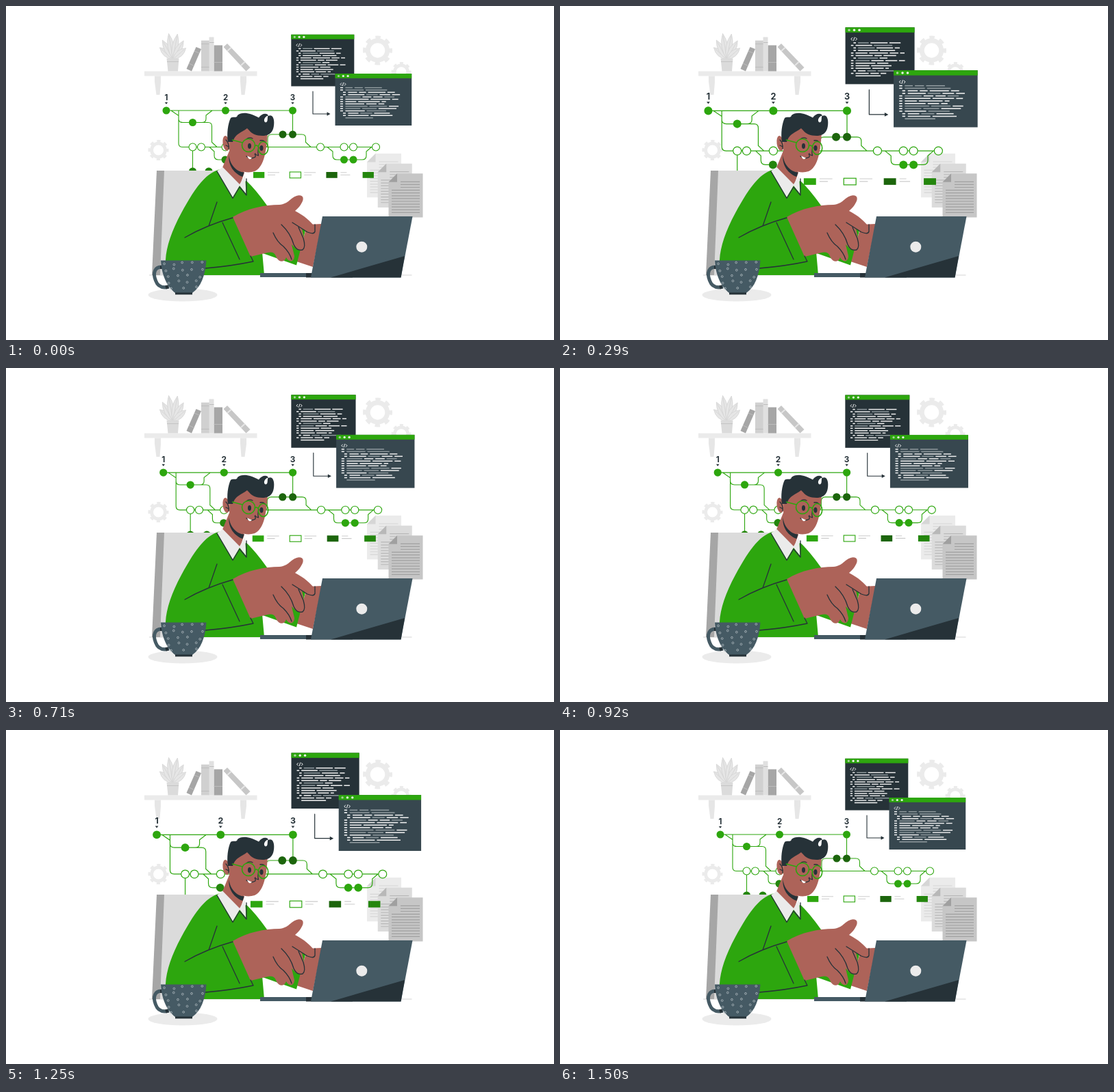
An HTML page that plays this animation: 800 by 489 pixels, repeating every 1.54 s.

```html
<!DOCTYPE html>
<html lang="en">
<head>
<meta charset="utf-8">
<title>Developer at work</title>
<style>
html, body { margin: 0; height: 100%; overflow: hidden; background: #fff; }
svg { display: block; width: 100%; height: 100%; }
.green { fill: #2da60e; }
.dark { fill: #263238; }
.deep { fill: #1c650c; }
.mid { fill: #24860d; }
.skin { fill: #ad6359; }
.slate { fill: #455a64; }
.pale { fill: #ebebeb; }
.wire { fill: none; stroke: #2da60e; stroke-width: 1.1; }
.frame { fill: none; stroke: #2da60e; stroke-width: 1.6; }
.open { fill: #fff; stroke: #2da60e; stroke-width: 1.1; }
.ink { fill: none; stroke: #263238; stroke-width: 1.3; stroke-linecap: round; stroke-linejoin: round; }
.label { font: 700 11.5px Inter, sans-serif; text-anchor: middle; fill: #263238; }
</style>
</head>
<body>
<svg viewBox="0 0 800 489">
  <g id="gears" fill="none" stroke="#ebebeb"></g>

  <g id="shelf">
    <path class="pale" d="M202 95.5H366.500V102.500H202Z"/>
    <path fill="#e6e6e6" d="M217 102.500h9v9l-1.500 18.500h-5L217 111ZM342 102.500h9v9L348.500 130h-5L342 111Z"/>
    <path fill="#a6a6a6" d="M277.500 60l7.500 3-14 32.500-7.500-3.500ZM303.500 57.500H316v38h-12.500Z"/>
    <path fill="#d0d0d0" d="M285 50.500h12v45h-12Z"/>
    <path fill="#e0e0e0" d="M296.500 45.500h7v50h-7Z"/>
    <path fill="#c7c7c7" d="M317.500 60l5.500-5 33.500 35-6 5.500Z"/>
    <path fill="none" stroke="#bdbdbd" d="M285 55.500h11.500M285 89.500h11.500M297 53.500h6.500M303.500 82.500H316M275 66l7 3M267 84l7.500 3.500"/>
    <path fill="none" stroke="#e6e6e6" stroke-width="2" d="M323 66l6-5.500M343 87l6-5.500"/>
    <g id="leaves" fill="#e6e6e6" stroke="#d2d2d2" stroke-width=".7"></g>
    <path fill="#dbdbdb" d="M234.500 76.500h18l-1.500 19h-14.500Z"/>
    <path fill="none" stroke="#c4c4c4" d="M235 81.500h17"/>
  </g>

  <g id="papers"></g>

  <g id="board">
    <path class="wire" d="M234 153H418.500V188M252 153V201Q252 206.500 257.500 206.500H540
      M241 153L252 160.500V165Q252 170.500 258 170.500H286Q292 170.500 292 165V160L301 153
      M272 170.500H295Q300.500 170.500 300.500 176V199.500L308 206.500M272.500 206.500V242
      M297 206.500L304 213V219Q304 225 310 225H320
      M380 206.500L382 204V194Q382 188 388 188H432Q437.500 188 437.500 193.500V199.500L445 206.500
      M469 206.500L477 213V219Q477 225 483 225H520Q526 225 526 219V213L533.500 206.500"/>
    <g id="nodes"></g>
    <g id="legend"></g>
    <path class="ink" style="stroke-width:1.1" d="M448 125V158H469"/>
    <path class="dark" d="M468.500 155.300L473.500 158L468.500 160.700Z"/>
    <g id="windows"></g>
  </g>

  <path stroke="#c9c9c9" stroke-width=".8" d="M209 394H592.500"/>
  <path fill="#dbdbdb" d="M230 241H320V394H222Z"/>
  <path fill="#a6a6a6" d="M220 241h11L225 394H213Z"/>

  <g id="person">
    <path class="skin" d="M440 320L461 319L448 382L424 374Z"/>
    <path class="green" d="M400 345L440 317L424 379.500L372 361Z"/>
    <path class="green" d="M313 239C289 245 273 272 256 303C242 329 234 352 233 372V394H377L374 360L400 320L381 292Q364 268 351 256L335 262Z"/>
    <path class="skin" d="M326 212L315 239L341 264L348 244Z"/>
    <path class="skin" d="M328 185C325 205 325 222 331 231C340 243 352 245.500 363 242C375 236 380 219 382 185L350 175Z"/>
    <path class="dark" d="M325.500 219C327 233 337 243 347.500 243.500L345.500 250C334 246 324 234 325.500 219Z"/>
    <ellipse class="skin" cx="321.500" cy="201" rx="5" ry="11" transform="rotate(-8 321.500 201)"/>
    <path class="ink" d="M321 196Q326 201 325 209M321 204L325 206"/>
    <path class="dark" d="M324 199C322 187 324 172 328 164C332 161 337 165 338 160C345 154 357 157 369 163.500C373 157 382 156 383 161C391 157 393 170 390 180C386 191 376 190.500 368 189.500C359 188 356 183 352 179C345 185 335 186 331 199Z"/>
    <path fill="#fff" d="M382.500 160.500C377 162 375 169 379 170.500C383 170 381 165 382.500 160.500Z"/>
    <path class="ink" d="M351 195Q355 191.500 360 194M371 197Q375 196 378 199M369 207Q367 214 368.500 219L363 217M351 220Q357 225 364 221V216"/>
    <path fill="#fff" d="M352 219.500L359 222.500Q355 227 352 219.500Z"/>
    <ellipse class="dark" cx="355.500" cy="205" rx="2.500" ry="4"/>
    <ellipse class="dark" cx="373" cy="208" rx="2.500" ry="4"/>
    <circle class="frame" cx="354" cy="204" r="9.500"/>
    <ellipse class="frame" cx="375.500" cy="208" rx="7.200" ry="9.500"/>
    <path class="frame" d="M363 205Q366 203 368.500 206M345 200L330 196"/>
    <path class="pale" d="M308 241.500L316.500 236L341 261L349 248L350.500 275L341 263L331 280Z"/>
    <path class="ink" d="M308 242L331 281.500L341 265L351 277V253"/>
    <path class="skin" d="M331 309C352 296 378 291 399 291C413 290 415 280 426 277.500C434 276 436 282 431 289.500C428 295 424 298 422 300C434 306 446 316 451 324C453 331 448 335 442 331L432 326L436 345C437 358 428 360 423 355L417 349L421 366C421 375 413 376 409 368C406 377 397 375 394 366Q391 359 382 361L357 367Z"/>
    <path class="ink" d="M308 287L296 322M261 339Q292 321 331 310M316 317L341 371M357 366L361 374Q328 381 291 384"/>
    <path class="ink" d="M418 317L440 331Q450 335 451 330V320M402 320Q415 332 420 349Q424 359 433 357Q438 353 434 340L427 324M390 332Q396 346 405 352Q414 361 417 371"/>
  </g>

  <path class="slate" d="M371 391H446V397H371Z"/>
  <path class="dark" d="M438 391H506V397.500H438Z"/>
  <path class="slate" d="M462 308H593.500L576.500 397.500H445Z"/>
  <path class="dark" d="M582 366L576.500 397.500H474Z"/>
  <circle class="pale" cx="519.300" cy="352.700" r="8"/>

  <ellipse class="pale" cx="258" cy="423" rx="50.500" ry="9.500"/>
  <path fill="none" stroke="#455a64" stroke-width="5" d="M230 382.500C217 380 214 391 218.500 402C222 412 230 413 238 411"/>
  <path fill="none" stroke="#263238" stroke-width="5" d="M225 382.500H230M233 412L237 411"/>
  <path class="slate" d="M226 372.500H292.500C291 395 284 412 272 420H247C236 412 227 395 226 372.500Z"/>
  <path class="dark" d="M247 419.500H272V422.500H247Z"/>
  <g id="dots" fill="none" stroke="#b4bec3" stroke-width=".8"></g>
</svg>
<script>
const LOOP = 1540, FRAMES = 37, CX = 413.5, CY = 149;
const byId = id => document.getElementById(id);
const times = (n, draw) => Array.from({ length: n }, (_, i) => draw(i)).join('');
const fill = (id, n, draw) => byId(id).innerHTML = times(n, draw);
const rect = (x, y, w, h, attrs) => `<rect x="${x}" y="${y}" width="${w}" height="${h}" ${attrs}/>`;
const circle = (x, y, r, attrs = '') => `<circle cx="${x}" cy="${y}" r="${r}" ${attrs}/>`;

let seed = 7;
const random = (min = 0, max = 1) => {
  seed = seed * 16807 % 2147483647;
  return min + (max - min) * seed / 2147483647;
};

// A ring plus eight dashes as teeth
function gear(x, y, r) {
  const tooth = r * .87 * Math.PI / 8;
  return circle(x, y, r * .66, `stroke-width="${r * .32}"`) +
    circle(x, y, r * .87, `stroke-width="${r * .26}" stroke-dasharray="${tooth}" stroke-dashoffset="${tooth / 2}"`);
}
byId('gears').innerHTML = gear(542.5, 65, 21.5) + gear(577, 96.5, 14.5) + gear(222.5, 211, 15);

// Leaves fan out from the pot, the middle ones longest
fill('leaves', 6, i => {
  const angle = -48 + i * 19.5, length = 41 - Math.abs(angle) * .32;
  return `<path transform="translate(243.500 78) rotate(${angle})" d="M0 0Q-9 ${-length / 2} 0 ${-length}Q9 ${-length / 2} 0 0V${3 - length}"/>`;
});

fill('papers', 3, i => {
  const paper = ['#ebebeb', '#dbdbdb', '#c6c6c6'][i], ink = ['#d6d6d6', '#b8b8b8', '#a0a0a0'][i];
  const lines = times(12, k => `M${k < 3 ? 17.5 : 4.5} ${12 + k * 4.1}H45.500`);
  return `<g transform="translate(${527 + i * 15.75} ${216 + i * 14.65})"><path fill="${paper}" d="M12.500 0H50V64.300H0V12.500Z"/>
    <path fill="${ink}" d="M12.500 0V12.500H0Z"/><path stroke="${ink}" stroke-width="1.200" d="${lines}"/></g>`;
});

const dots = (kind, y, ...xs) => xs.map(x => circle(x, y, 5.5, `class="${kind}"`)).join('');
const steps = [234, 320.5, 418.5];
byId('nodes').innerHTML =
  dots('green', 153, ...steps) + dots('green', 170.5, 272.5) + dots('deep', 188, 404, 418.5) +
  dots('open', 206.5, 272.5, 285, 320.5, 459, 493.5, 507, 540) +
  dots('mid', 225, 320) + dots('green', 225, 493.5, 507) + dots('mid', 242, 272.5, 296) +
  steps.map((x, i) => `<text class="label" x="${x}" y="138">${i + 1}</text>
    <path class="dark" d="M${x - 2.2} 141h4.400l-2.200 2.800Z"/>`).join('');

fill('legend', 4, i => {
  const x = 361 + i * 53.2;
  return rect(x, 243, 16.3, 8.8, `class="${['green', 'open', 'deep', 'mid'][i]}"`) +
    (i < 3 ? `<path stroke="#ccc" d="M${x + 21} 243.800h${i < 2 ? 17 : 9}m${i < 2 ? -17 : -9} 3.500h${i < 2 ? 11 : 14}"/>` : '');
});

// One line of code: a marker, then bars up to a random end
function codeRow(i) {
  const bar = (a, b, color) => `<path stroke="${color}" d="M${a} ${i * 3.62}H${b}"/>`;
  const last = i == 13, indent = !last && random() < .5 ? 3.5 : 0;
  const end = last ? 42 : random(45, 79);
  let row = last ? '' : bar(indent, indent + 3.5, '#fff');
  for (let x = indent + 6.5, next; x < end - 4; x = next + 2.5) {
    next = Math.min(end, x + random(9, last ? 60 : 30));
    row += bar(x, next, random() < .25 ? '#929ca0' : '#f2f2f2');
  }
  return row;
}
const codeWindow = (x, y, w, h, color) => rect(x, y, w, h, `fill="${color}"`) + rect(x, y, w, 6.8, 'class="green"') +
  times(3, i => circle(x + 5 + i * 6.8, y + 3.5, 1.6, `fill="${i ? '#f2f2f2' : '#a9cf9f'}"`)) +
  `<path fill="none" stroke="#fff" stroke-width=".9" d="M${x + 9.5} ${y + 13.5}l-2 2 2 2m1.300 .5l1.500-5m1.200 .500l2 2-2 2"/>
  <g stroke-width="1.500" transform="translate(${x + 7.5} ${y + 20.6}) scale(${w / 98} .937)">${times(14, codeRow)}</g>`;
byId('windows').innerHTML =
  codeWindow(416.3, 41.8, 92, 75.7, '#263238') + codeWindow(480.5, 99, 111.7, 76, '#37474f');

// Staggered rows of rings, narrowing with the mug
fill('dots', 5, row => times(5 - (row >> 1), i => {
  const n = 5 - (row >> 1), spread = 29 - row * 3;
  return circle(259 + spread * (2 * i / (n - 1) - 1) + random(-2, 2), 377 + row * 9 + random(-2, 2), 1.4);
}));

// Two linear heartbeats per loop: [step, strength]
const beats = [[0, 0], [6.7, 1], [20.2, 0], [28.5, .97], [36, 0], [37, 0]];
function pulse(step) {
  const i = beats.findIndex(([at]) => at > step);
  const [a, from] = beats[i - 1], [b, to] = beats[i];
  return from + (to - from) * (step - a) / (b - a);
}

function draw() {
  const t = performance.now() % LOOP;
  const step = Math.floor(t / LOOP * FRAMES + .1) % FRAMES;
  const scale = 1 + .1 * pulse(step);
  byId('board').setAttribute('transform', `translate(${CX} ${CY}) scale(${scale}) translate(${-CX} ${-CY})`);
  requestAnimationFrame(draw);
}
draw();
</script>
</body>
</html>
```
